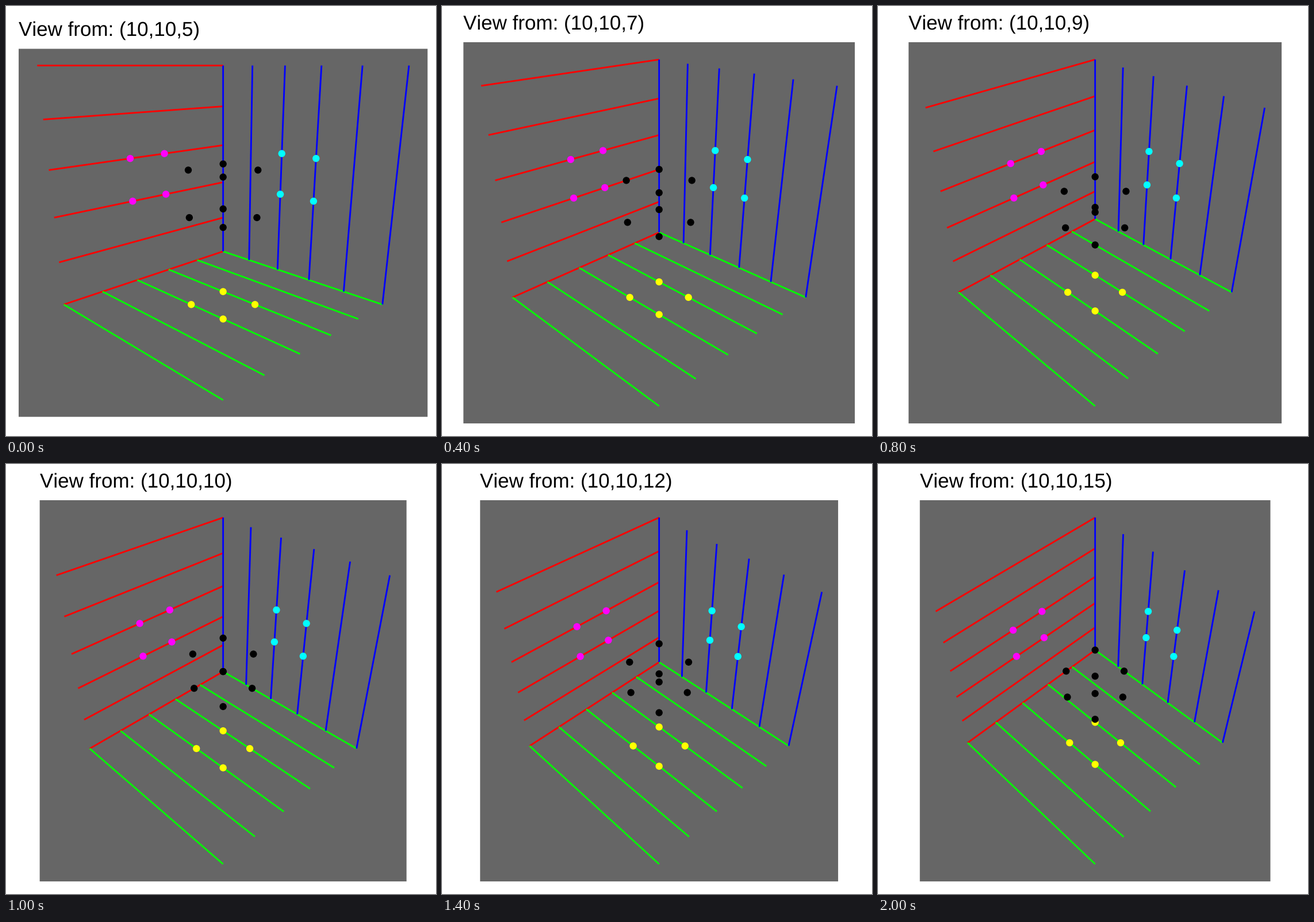
Write a matplotlib script that moves like this. It is 748x748 px and loops after 2.2 s.

```python
from itertools import product

import numpy as np
import matplotlib.pyplot as plt
from matplotlib.animation import FuncAnimation
from matplotlib.patches import Circle, Rectangle

SIZE, DPI = 748, 100
PT = 72 / DPI                      # points per pixel
LEFT, RIGHT = 22.0, 733.33         # largest room for the panel
TOP, BOTTOM = 63.0, 726.1
PAD = 1.1                          # panel size relative to the data range
HEIGHTS = range(5, 16)

plt.rcParams["text.hinting"] = "none"
plt.rcParams["text.kerning_factor"] = 6

# Points are (right, left, up) in the room's corner coordinates.
ticks = range(6)
segments = (
    [("#ff0000", (0, 0, k), (0, 5, k)) for k in ticks]
    + [("#00ff00", (0, k, 0), (5, k, 0)) for k in ticks]
    + [("#0000ff", (k, 0, 0), (k, 0, 5)) for k in ticks]
)
pairs = list(product((2, 3), repeat=2))
dots = (
    [("#ffff00", (a, b, 0)) for a, b in pairs]
    + [("#ff00ff", (0, a, b)) for a, b in pairs]
    + [("#00ffff", (a, 0, b)) for a, b in pairs]
    + [("#000000", p) for p in product((2, 3), repeat=3)]
)
ends = np.array([p for _, a, b in segments for p in (a, b)], float)
centers = np.array([p for _, p in dots], float)


def project(pts, height):
    """Perspective view from (10, 10, height) towards the corner."""
    ground = np.hypot(10, 10)
    dist = np.hypot(ground, height)
    cos, sin = ground / dist, height / dist
    side = (pts[:, 0] - pts[:, 1]) / np.sqrt(2)
    out = (pts[:, 0] + pts[:, 1]) / np.sqrt(2)
    up = pts[:, 2]
    zoom = dist / (dist - out * cos - up * sin)
    return np.column_stack([side * zoom, (up * cos - out * sin) * zoom])


fig = plt.figure(figsize=(SIZE / DPI, SIZE / DPI), dpi=DPI, facecolor="white")
ax = fig.add_axes([0, 0, 1, 1])
ax.set_xlim(0, SIZE)
ax.set_ylim(SIZE, 0)
ax.axis("off")

panel = ax.add_patch(Rectangle((0, 0), 1, 1, fc="#666666", lw=0, snap=False))
lines = [
    ax.plot([], [], color=c, lw=2.845 * PT, solid_capstyle="butt", snap=False)[0]
    for c, _, _ in segments
]
circles = [
    ax.add_patch(Circle((0, 0), 6.16, fc=c, lw=0, snap=False, zorder=3))
    for c, _ in dots
]
title = ax.text(0, 0, "", family="Liberation Sans", size=35 * PT,
                color="black", ha="left", va="baseline")


def draw(i):
    height = HEIGHTS[i]
    flat = project(ends, height)
    low, high = flat.min(axis=0), flat.max(axis=0)
    span = (high - low) * PAD
    scale = min((RIGHT - LEFT) / span[0], (BOTTOM - TOP) / span[1])
    mid = np.array([(LEFT + RIGHT) / 2, (TOP + BOTTOM) / 2])

    def to_px(p):
        return mid + (p - (low + high) / 2) * scale * [1, -1]

    w, h = span * scale
    x, y = mid - [w / 2, h / 2]
    panel.set_bounds(x, y, w, h)
    for line, seg in zip(lines, to_px(flat).reshape(-1, 2, 2)):
        line.set_data(seg[:, 0], seg[:, 1])
    for circle, c in zip(circles, to_px(project(centers, height))):
        circle.set_center(c)
    title.set_position((x, y - 22.7))
    title.set_text(f"View from: (10,10,{height})")
    return [panel, *lines, *circles, title]


anim = FuncAnimation(fig, draw, frames=len(HEIGHTS), interval=200,
                     repeat=True, repeat_delay=0, blit=False)
plt.show()
```
